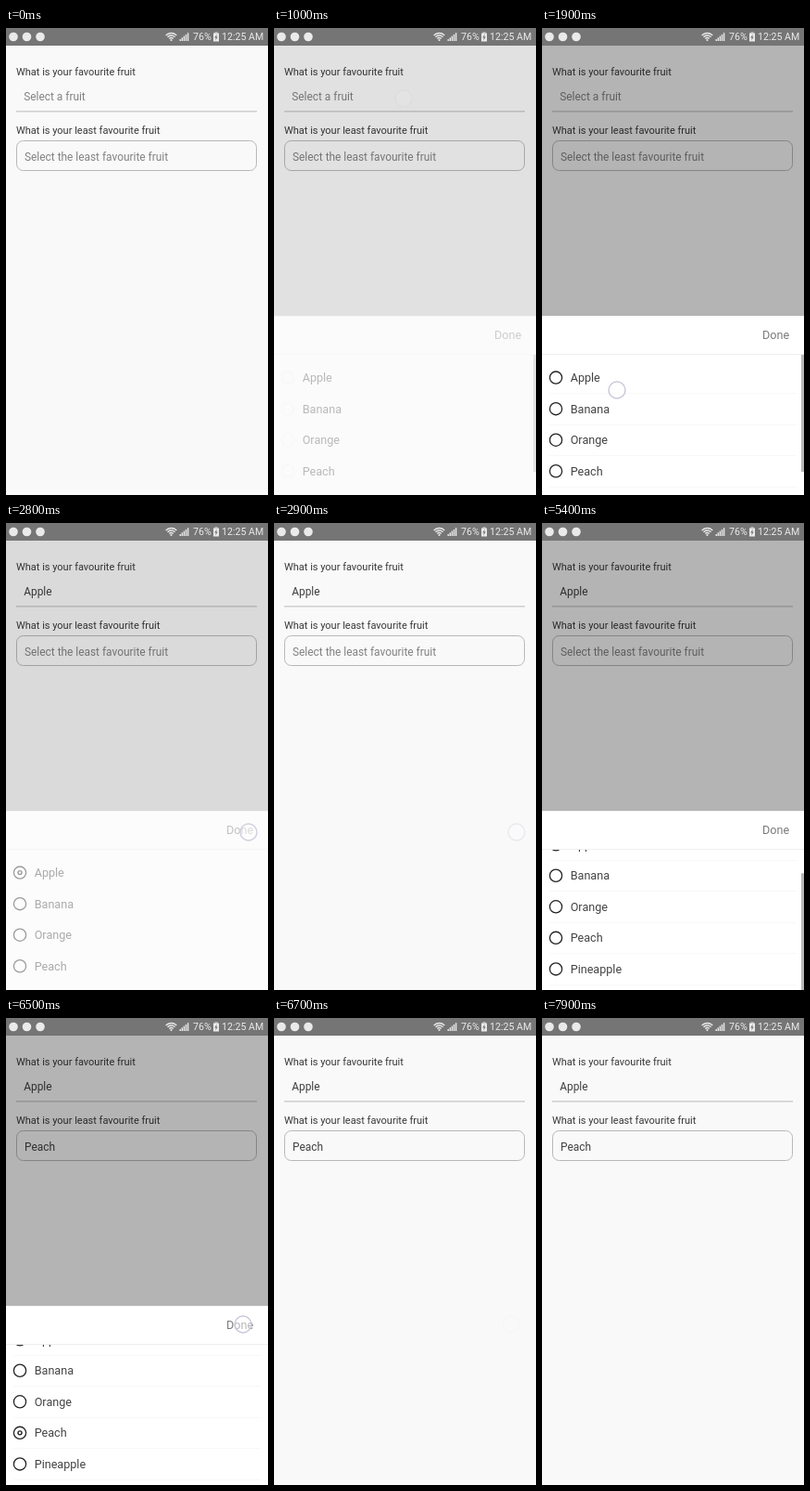
An HTML page with a canvas that plays this animation: 283x503 px, repeating every 8000 ms.

```html
<!DOCTYPE html>
<html lang="en">
<head>
<meta charset="utf-8">
<style>
  html, body { margin: 0; height: 100%; overflow: hidden; background: #f9f9f9; }
  canvas { display: block; width: 283px; height: 503px; }
</style>
</head>
<body>
<canvas width="283" height="503"></canvas>
<script>
const W = 283, H = 503, LOOP = 8000;
const ctx = document.querySelector('canvas').getContext('2d');
const FRUITS = ['Apple', 'Banana', 'Orange', 'Peach', 'Pineapple'];

// Each picker: modal fades, moment the radios appear, choice, scroll and scrollbar fade
const PICKERS = [
  { open: [930, 1130], close: [2690, 2890], radiosAt: 1390, pick: 0, pickAt: 2050,
    scroll: null, bar: [2050, 2350] },
  { open: [3680, 3880], close: [6510, 6700], radiosAt: 4090, pick: 3, pickAt: 5650,
    scroll: [4750, 5180], bar: [5450, 5900] }
];
const TOUCHES = [
  { from: 500, to: 850, x: 140, y: 76 },
  { from: 1860, to: 2150, x: 81, y: 390 },
  { from: 2590, to: 2780, x: 262, y: 333 },
  { from: 3590, to: 3690, x: 140, y: 139 },
  { from: 4690, to: 5050, x: 150, y: 455, dy: -60 },
  { from: 5450, to: 5750, x: 81, y: 449 },
  { from: 6390, to: 6530, x: 256, y: 330 }
];

const ramp = (t, a, b) => Math.min(1, Math.max(0, (t - a) / (b - a)));
const easeOut = p => 1 - (1 - p) ** 2;

function rect(x, y, w, h, color) {
  ctx.fillStyle = color;
  ctx.fillRect(x, y, w, h);
}

function text(str, x, y, size, color) {
  ctx.font = `${size}px Roboto, sans-serif`;
  ctx.fillStyle = color;
  ctx.fillText(str, x, y);
}

function circle(x, y, r, { fill, stroke, width = 1 }) {
  ctx.beginPath();
  ctx.arc(x, y, r, 0, Math.PI * 2);
  if (fill) { ctx.fillStyle = fill; ctx.fill(); }
  if (stroke) { ctx.strokeStyle = stroke; ctx.lineWidth = width; ctx.stroke(); }
}

function drawStatusBar() {
  const white = '#eaeaea';
  rect(0, 0, W, 19, '#757575');
  for (const x of [8, 22.5, 37]) circle(x, 9.5, 4.8, { fill: white });

  ctx.strokeStyle = white;
  ctx.lineWidth = 1.3;
  for (const r of [3, 5.5, 8]) {
    ctx.beginPath();
    ctx.arc(178.5, 13.5, r, -Math.PI * 0.76, -Math.PI * 0.24);
    ctx.stroke();
  }
  circle(178.5, 13, 1.1, { fill: white });
  for (let i = 0; i < 5; i++) rect(187.5 + i * 2.1, 12 - i * 1.7, 1.4, 2 + i * 1.7, white);

  text('76%', 202, 13.4, 10.6, white);
  rect(224, 5.5, 6, 9, white);
  rect(225.5, 4.5, 3, 1, white);
  ctx.fillStyle = '#757575';
  ctx.beginPath();
  ctx.moveTo(227.8, 6.5);
  ctx.lineTo(225.2, 10.4);
  ctx.lineTo(226.8, 10.4);
  ctx.lineTo(226.2, 13.4);
  ctx.lineTo(228.8, 9.4);
  ctx.lineTo(227.2, 9.4);
  ctx.fill();
  text('12:25 AM', 233, 13.4, 10.6, white);
}

function drawForm(t) {
  const field = (i, placeholder, x, y) => {
    const { pick, pickAt } = PICKERS[i];
    const chosen = t >= pickAt;
    text(chosen ? FRUITS[pick] : placeholder, x, y, 11.9, chosen ? '#404040' : '#828282');
  };
  rect(0, 0, W, H, '#f9f9f9');
  text('What is your favourite fruit', 11, 50.5, 11, '#383838');
  field(0, 'Select a fruit', 19.2, 78.3);
  rect(11, 89.4, 260, 1, '#b8b8b8');
  text('What is your least favourite fruit', 11, 113.7, 11, '#383838');
  ctx.beginPath();
  ctx.roundRect(11.5, 121.5, 259, 32, 7);
  ctx.strokeStyle = '#b8b8b8';
  ctx.lineWidth = 1;
  ctx.stroke();
  field(1, 'Select the least favourite fruit', 20, 142.5);
}

// The whole modal, backdrop and sheet, fades in place
function drawPicker(p, t) {
  const shown = ramp(t, ...p.open) - ramp(t, ...p.close);
  if (shown <= 0) return;
  const scroll = p.scroll ? 30.4 * easeOut(ramp(t, ...p.scroll)) : 0;

  ctx.save();
  ctx.globalAlpha = shown;
  rect(0, 0, W, 310.3, 'rgba(0,0,0,.277)');
  rect(0, 310.3, W, H, '#ffffff');
  text('Done', 238, 335.2, 12.6, '#7b7b7b');
  rect(0, 351, W, 1, '#eeeeee');

  ctx.beginPath();
  ctx.rect(0, 352, W, 151);
  ctx.clip();
  FRUITS.forEach((name, i) => {
    const y = 376.6 + i * 33.55 - scroll;
    ctx.globalAlpha = shown;
    text(name, 30.7, y + 4.4, 12.6, '#434343');
    rect(8, Math.round(y + 16.5), 267, 1, '#f8f8f8');
    ctx.globalAlpha = shown * (t < p.radiosAt ? 0.05 : 1);
    circle(15, y, 6.6, { stroke: '#222222', width: 1.3 });
    if (i === p.pick && t >= p.pickAt) circle(15, y, 2, { stroke: '#222222', width: 1.4 });
  });
  ctx.globalAlpha = shown * (1 - ramp(t, ...p.bar));
  rect(280, 352 + scroll * 0.83, 3, 126, '#b8b8b8');
  ctx.restore();
}

function drawTouch({ from, to, x, y, dy = 0 }, t) {
  const alpha = ramp(t, from - 30, from) * (1 - ramp(t, to, to + 180));
  if (!alpha) return;
  ctx.globalAlpha = alpha;
  circle(x, y + dy * ramp(t, from + 60, to), 9,
    { fill: 'rgba(255,255,255,.45)', stroke: '#c9c9da', width: 1.4 });
  ctx.globalAlpha = 1;
}

function draw(now) {
  const t = now % LOOP;
  drawForm(t);
  PICKERS.forEach(p => drawPicker(p, t));
  TOUCHES.forEach(touch => drawTouch(touch, t));
  drawStatusBar();
  requestAnimationFrame(draw);
}
requestAnimationFrame(draw);
</script>
</body>
</html>
```
